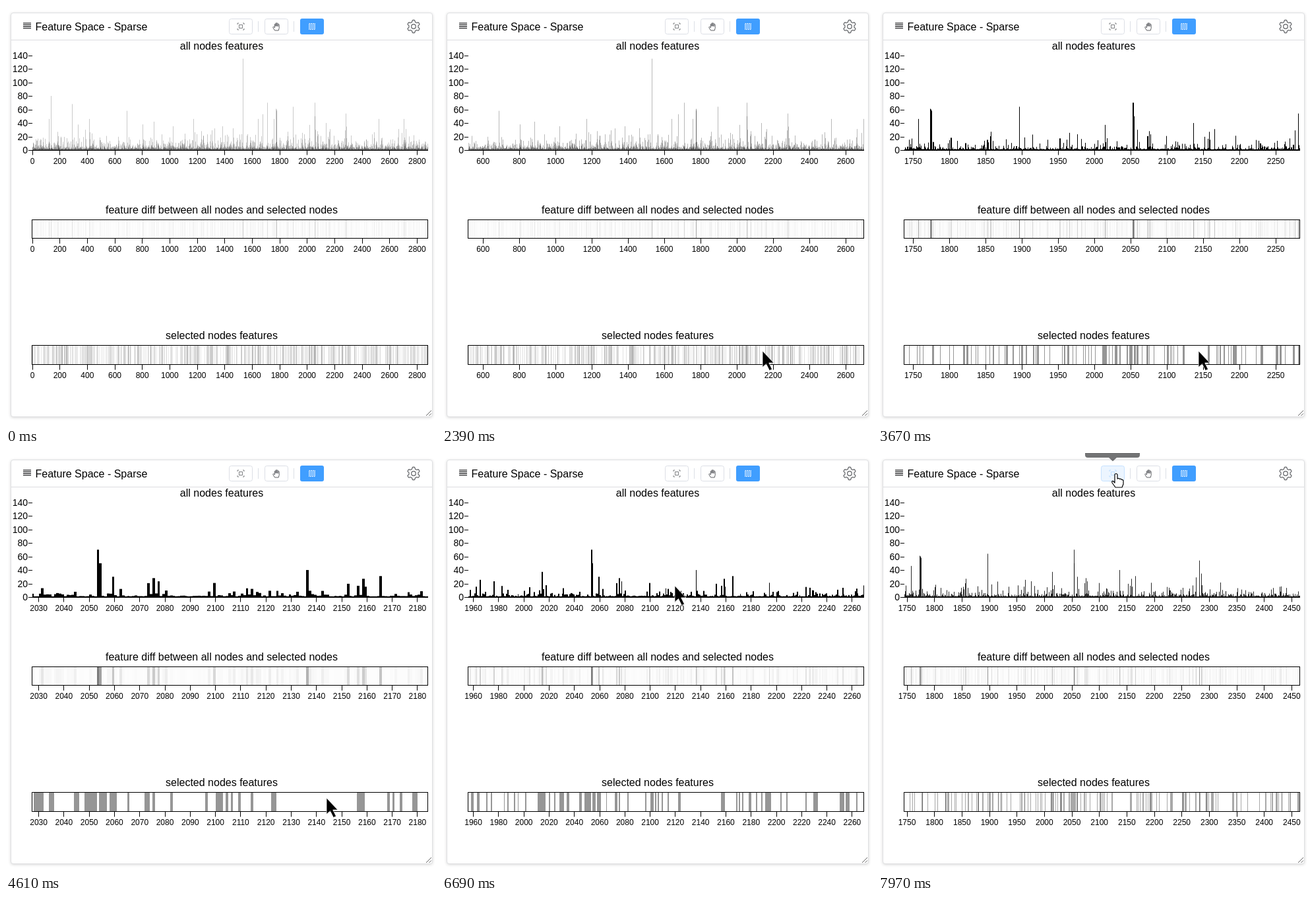
An HTML page with a canvas that plays this animation: 652x634 px, repeating every 8000 ms.

```html
<!DOCTYPE html>
<html lang="en">
<head>
<meta charset="utf-8">
<title>Feature Space</title>
<style>
html, body { margin: 0; width: 100%; height: 100%; overflow: hidden; background: #fff; }
.card { position: absolute; left: 7px; top: 10px; width: 638px; height: 610px; border: 1px solid #dfe0e2;
  border-radius: 4px; background: #fff; box-shadow: 0 1px 4px rgba(0,0,0,.16); }
canvas, svg { position: absolute; left: 0; top: 0; }
text { font-family: "Liberation Sans", Arial, sans-serif; fill: #000; }
.title { font-size: 16px; }
.mid { text-anchor: middle; }
.x { font-size: 12px; text-anchor: middle; }
.y { font-size: 14px; text-anchor: end; }
.line { fill: none; stroke: #000; }
.icon { fill: none; stroke: #606266; }
.btn { fill: #fff; stroke: #dcdfe6; }
.hover .btn { fill: #ecf5ff; stroke: #c6e2ff; }
.hover .icon { stroke: #b3d8ff; }
</style>
</head>
<body>
<div class="card"></div>
<canvas id="plot" width="652" height="634"></canvas>
<svg width="652" height="634" viewBox="0 0 652 634">
  <path d="M8 51.5H646" stroke="#dcdde0"/>
  <path d="M26 25.8H38M26 28.4H38M26 31H38M26 33.6H38" stroke="#303133" stroke-width="1.3"/>
  <text class="title" x="44.5" y="37">Feature Space - Sparse</text>
  <g id="fit">
    <rect class="btn" x="338.5" y="19.5" width="35" height="23" rx="3"/>
    <path class="icon" d="M351 28V26H353M359 26H361V28M361 34V36H359M353 36H351V34M353.500 28.500H358.500V33.500H353.500Z" stroke-width=".8"/>
  </g>
  <path d="M382.500 23V39M436.500 23V39" stroke="#dcdfe6"/>
  <rect class="btn" x="392.5" y="19.5" width="35" height="23" rx="3"/>
  <path class="icon" d="M407.500 37L404.800 32.600Q404.600 31 406.200 31.600L407.500 33V27.500Q408.300 26.300 409 27.500V30.500V26Q409.900 25 410.700 26V30.500V26.500Q411.600 25.400 412.400 26.500V31V28Q413.300 27 414.200 28V33.500L413.200 37Z"/>
  <rect x="446" y="19" width="36" height="24" rx="3" fill="#409eff"/>
  <rect x="459.5" y="26.500" width="9" height="9" fill="#83c0ff" stroke="#fff" stroke-dasharray="1.500 1.500"/>
  <path id="gear" class="icon" stroke-width="1.2" stroke-linejoin="round"/>
  <circle class="icon" cx="618" cy="31" r="3.3" stroke-width="1.2"/>
  <path d="M637 620L645 612M641.500 620L645 616.500" stroke="#666"/>

  <text class="title mid" x="327" y="66">all nodes features</text>
  <text class="title mid" x="327" y="314">feature diff between all nodes and selected nodes</text>
  <text class="title mid" x="327" y="504">selected nodes features</text>
  <path class="line" d="M40 218.500H640"/>
  <rect class="line" x="39.5" y="323.500" width="600" height="28"/>
  <rect class="line" x="39.5" y="513.500" width="600" height="29"/>
  <g id="yAxis"></g>
  <g id="xAxes"></g>

  <g id="tip" fill="#303133">
    <rect x="314" y="-24" width="83" height="31" rx="4"/>
    <path d="M350 7H362L356 12.500Z"/>
  </g>
  <path id="arrow" d="M0 0V24.500L5.500 19.500L10.500 29.500L14.500 27.700L9.700 18H17Z" stroke="#fff" stroke-width=".7"/>
  <path id="hand" d="M-2 14V1.500Q0 -1 2 1.500V8Q4 6.500 5.500 8.500Q7.500 7.500 8.500 9.500Q10.500 9 11 11V16L9 21H-1L-6 14Q-7 11 -4.500 11.500Z" fill="#fff" stroke="#000" stroke-width="1.2" stroke-linejoin="round"/>
</svg>
<script>
const COUNT = 2880, LEFT = 40, WIDTH = 600, BASE = 218, UNIT = 1.0243, LOOP = 8000;
const $ = id => document.getElementById(id);
const ctx = $('plot').getContext('2d');

let seed = 11;
function random() {
  seed = (seed * 1664525 + 1013904223) >>> 0;
  return (seed + 1) / 4294967297;
}

// long-tailed counts with a few landmark spikes
const heights = Array.from({ length: COUNT }, () => Math.min(46, 1 + 2.2 * (-Math.log(random())) ** 1.6));
Object.assign(heights, { 134: 80, 288: 68, 687: 58, 1531: 135, 1676: 53, 1707: 70, 1773: 61, 1774: 60,
  1775: 58, 1896: 64, 2053: 70, 2054: 50, 2059: 30, 2075: 28, 2158: 27, 2165: 31, 2281: 54 });

// selected features come in short runs
const picked = [];
for (let n = 0; n < COUNT; n++) picked.push(random() < (picked[n - 1] ? .4 : .17));

// wheel bursts: the value `focus` stays `offset` pixels from the left edge
const bursts = [
  { from: 1540, to: 1610, steps: 2, level: .4, focus: 2144.16, offset: 446.7 },
  { from: 2860, to: 3670, steps: 4, level: 2.4, focus: 2144.16, offset: 446.7 },
  { from: 3870, to: 4610, steps: 4, level: 4.2, focus: 2144.16, offset: 446.7 },
  { from: 4880, to: 5080, steps: 2, level: 4.6, focus: 2144.16, offset: 446.7 },
  { from: 6420, to: 7230, steps: 4, level: 2, focus: 2118.6, offset: 311.2 }];
const NOTCH = .2;

// pointer moves: start, end, destination
const moves = [[70, 490, 486, 347], [820, 1080, 478, 333], [1680, 1930, 479, 507], [2130, 2390, 486, 522],
  [5150, 5350, 352, 119], [5360, 5490, 339, 182], [5630, 5750, 338, 218], [6080, 6150, 353, 201],
  [7300, 7700, 361, 31]];

// share done when `steps` equal jumps happen from `from` to `to`, both included
function stepped(time, from, to, steps) {
  const gap = (to - from) / (steps - 1);
  const done = Math.floor((time - from) / gap + 1e-6) + 1;
  return Math.max(0, Math.min(steps, done)) / steps;
}

function viewAt(time) {
  let level = 0, scale = WIDTH / COUNT, start = 0;
  for (const b of bursts) {
    if (time < b.from) break;
    const exact = level + (b.level - level) * stepped(time, b.from, b.to, b.steps);
    level = Math.floor(exact / NOTCH + 1e-6) * NOTCH;
    scale = WIDTH / COUNT * 2 ** level;
    start = b.focus - b.offset / scale;
  }
  return { scale, start: Math.max(0, start) };
}

function pointerAt(time) {
  let x = 569, y = 550;
  for (const [from, to, nextX, nextY] of moves) {
    const p = stepped(time, from, to, Math.round((to - from) / 70) + 1);
    x += (nextX - x) * p;
    y += (nextY - y) * p;
  }
  return [x, y];
}

function tickStep(span) {
  const raw = span / 12, power = 10 ** Math.floor(Math.log10(raw)), rest = raw / power;
  return power * (rest >= 7.07 ? 10 : rest >= 3.162 ? 5 : rest >= 1.414 ? 2 : 1);
}

function drawPlots({ scale, start }) {
  const end = start + WIDTH / scale;
  const toX = n => LEFT + (n - start) * scale;
  const ink = Math.min(1, scale);

  ctx.clearRect(0, 0, 652, 634);
  ctx.save();
  ctx.beginPath();
  ctx.rect(LEFT, 60, WIDTH, 500);
  ctx.clip();
  for (let n = Math.floor(start); n < Math.min(COUNT, end); n++) {
    const x = Math.round(toX(n)), width = Math.max(1, Math.round(toX(n + 1)) - x);
    const bar = (y, height, alpha) => {
      ctx.fillStyle = `rgba(0,0,0,${alpha * ink})`;
      ctx.fillRect(x, y, width, height);
    };
    const h = heights[n];
    bar(BASE - h * UNIT, h * UNIT, 1);
    bar(324, 27, Math.min(1, h / 135));
    if (picked[n]) bar(514, 28, .41);
  }
  ctx.restore();

  const step = tickStep(end - start);
  let axes = '';
  for (let v = Math.ceil(start / step) * step; v <= end; v += step) {
    const x = toX(v);
    for (const [y, label] of [[218, 239], [352, 372], [543, 563]])
      axes += `<path class="line" d="M${Math.floor(x) + .5} ${y}v7.500"/><text class="x" x="${x}" y="${label}">${v}</text>`;
  }
  $('xAxes').innerHTML = axes;
}

function buildStatic() {
  let axis = '';
  for (let v = 0; v <= 140; v += 20) {
    const y = Math.round(BASE - v * UNIT) + .5;
    axis += `<path class="line" d="M34 ${y}h6"/><text class="y" x="33" y="${y + 4.5}">${v}</text>`;
  }
  $('yAxis').innerHTML = axis;
  const points = [];
  for (let i = 0; i < 72; i++) {
    const a = i * Math.PI / 36;
    const r = 8.3 + 1.3 * Math.tanh(-3 * Math.cos(6 * a));
    points.push(`${(618 + r * Math.cos(a)).toFixed(2)} ${(31 + r * Math.sin(a)).toFixed(2)}`);
  }
  $('gear').setAttribute('d', `M${points.join('L')}Z`);
}

function show(id, visible, x, y) {
  $(id).setAttribute('visibility', visible ? 'visible' : 'hidden');
  $(id).setAttribute('transform', `translate(${x} ${y})`);
}

let drawnScale = 0;
function render(time) {
  const view = viewAt(time);
  if (view.scale !== drawnScale) drawPlots(view);
  drawnScale = view.scale;
  const [x, y] = pointerAt(time);
  const hovering = y < 45;
  show('arrow', time >= 70 && !hovering, x, y);
  show('hand', hovering, x, y);
  $('fit').classList.toggle('hover', hovering);
  $('tip').setAttribute('opacity', Math.max(0, Math.min(.68, (time - 7770) / 300)));
}

buildStatic();
const origin = performance.now();
function frame() {
  render((performance.now() - origin) % LOOP);
  requestAnimationFrame(frame);
}
frame();
</script>
</body>
</html>
```
